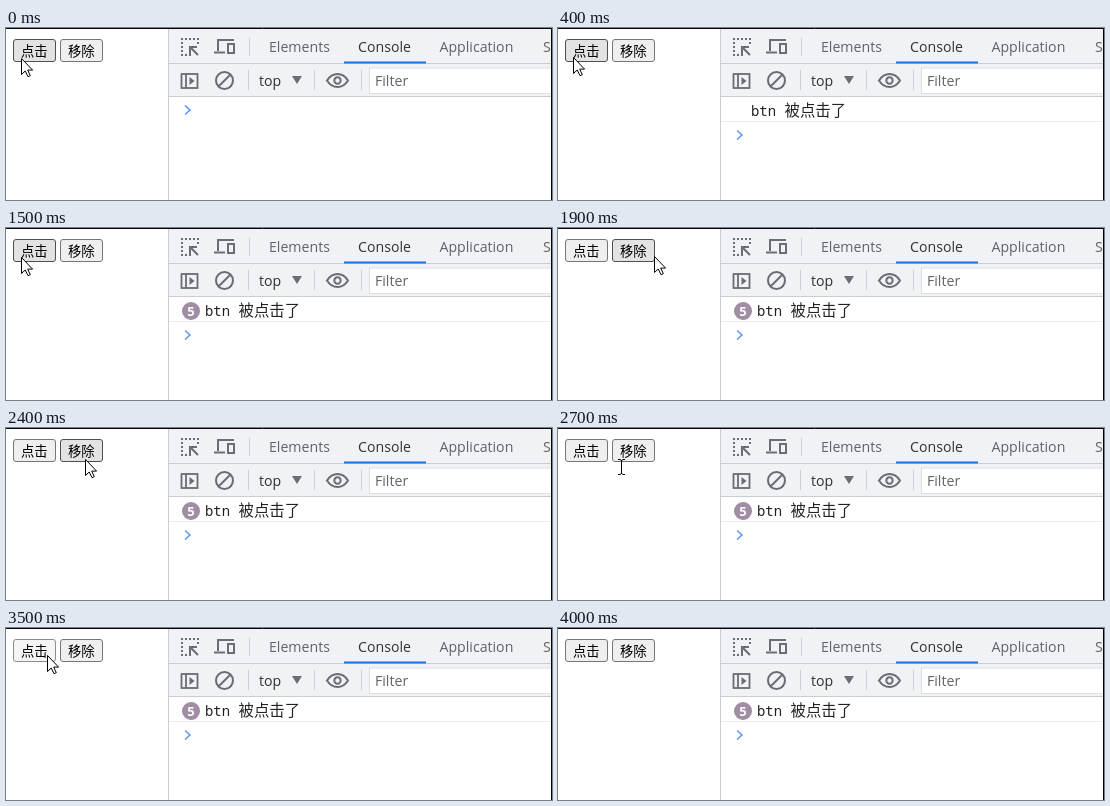
An HTML page that plays this animation: 546 by 172 pixels, repeating every 4600 ms.

```html
<!DOCTYPE html>
<html lang="zh">
<head>
<meta charset="utf-8">
<style>
  html, body { margin: 0; width: 100%; height: 100%; overflow: hidden; background: #fff; }
  svg { display: block; }
  text { font: 14.15px "Open Sans", sans-serif; fill: #5f6368; white-space: pre; }
  .dark { fill: #303236; }
  .btn rect { fill: #efefef; stroke: #767676; }
  .btn.hover rect { fill: #e3e3e3; stroke: #4f4f4f; }
  .btn.active rect { fill: #f5f5f5; stroke: #8d8d8d; }
  .btn text { font: 13.33px "Noto Sans CJK SC", sans-serif; fill: #000; }
  .icon { fill: none; stroke: #6a6d71; stroke-width: 2; }
  .solid { fill: #6a6d71; stroke: none; }
  .sep { stroke: #cacdd1; fill: none; }
  #log text { fill: #222; }
  #log .code { font: 13.9px "Noto Sans Mono", monospace; }
  #log .han { font: 15.4px "Noto Sans CJK SC", sans-serif; }
  #log #count { font: bold 13px "Open Sans", sans-serif; fill: #fff; text-anchor: middle; }
</style>
</head>
<body>
<svg width="546" height="172" viewBox="0 0 546 172">
  <rect width="546" height="172" fill="#fff"/>

  <!-- page buttons -->
  <g class="btn"><rect x="7.5" y="11.5" width="42" height="22" rx="2.5"/><text x="15" y="27.5">点击</text></g>
  <g class="btn"><rect x="54.5" y="11.5" width="42" height="22" rx="2.5"/><text x="62" y="27.5">移除</text></g>

  <!-- developer tools -->
  <rect x="163" y="1" width="382" height="68" fill="#f0f2f5"/>
  <path class="sep" d="M162.5 1V172M163 35.5H545M163 68.5H545M243.5 10V28M242.5 42V62M308.5 42V62M355.5 42V62"/>
  <rect x="338" y="33.5" width="82" height="2" fill="#1a73e8"/>
  <rect x="363.5" y="40" width="184" height="25.5" fill="#fff" stroke="#dcdfe3"/>
  <text x="263" y="24">Elements</text>
  <text x="352" y="24" class="dark">Console</text>
  <text x="433.5" y="24">Application</text>
  <text x="537" y="24">Sources</text>
  <text x="253" y="57.5" class="dark">top</text>
  <text x="369" y="58">Filter</text>

  <g class="icon">
    <path d="M175 11H193M176 10V28M192 10V16M175 27H185" stroke-dasharray="2"/>
    <path d="M192 27L185 20M184 26V19H191"/>
    <path d="M212 23V12H228M208 24.5H219"/>
    <rect x="222" y="16" width="6" height="9"/>
    <rect x="175.5" y="46" width="16" height="14" stroke-width="1.8"/>
    <path d="M180 46V60" stroke-width="1.8"/>
    <circle cx="218.5" cy="52.5" r="8.5"/>
    <path d="M212.5 58.5L224.5 46.5"/>
    <path d="M321 52.5Q325 46 331.5 46T342 52.5Q338 59 331.5 59T321 52.5Z"/>
    <circle cx="331.5" cy="52.5" r="3.2"/>
    <path class="solid" d="M183.5 49V57L188.5 53ZM286 48H296L291 56Z"/>
  </g>

  <g id="log">
    <path d="M163 93.5H545" stroke="#ececee"/>
    <g id="badge"><circle cx="185" cy="83" r="9" fill="#a08da4"/><text id="count" x="185" y="87.7"></text></g>
    <g id="message"><text class="code" x="199" y="88">btn</text><text class="han" x="232.5" y="88">被点击了</text></g>
  </g>
  <path id="prompt" d="M179 77.5L184 82L179 86.5" fill="none" stroke="#5f97ee" stroke-width="1.6"/>

  <path d="M0 .5H546M545.5 0V172" stroke="#000"/>

  <g id="pointer">
    <path id="arrow" d="M.5 .5V16.5L4.2 13L7 18.7L9.3 17.7L6.7 12.1H11.6Z" fill="#fff" stroke="#000"/>
    <path id="beam" d="M-3 -7.5H-1L.5 -6.5L2 -7.5H4M.5 -7V7M-3 7.5H-1L.5 6.5L2 7.5H4" fill="none" stroke="#000"/>
  </g>
</svg>
<script>
const LOOP = 4600, STEP = 100;
const $ = id => document.getElementById(id);
const buttons = [...document.querySelectorAll('.btn')];

// pointer path: time, x, y
const path = [
  [0, 15, 30], [100, 15, 29], [1500, 15, 29], [1600, 24, 30], [1700, 51, 32],
  [1800, 82, 30], [1900, 96, 28], [2000, 86, 27], [2300, 86, 27], [2500, 72, 34],
  [2600, 65, 39], [2700, 63, 39], [2800, 51, 33], [2900, 41, 27], [3500, 41, 27],
  [3600, 70, 36], [3900, 509, 153]
];
const presses = [800, 1000, 1200, 1400, 2100, 2900, 3100, 3300, 3500];
const clicks = [300, 900, 1100, 1300, 1500];

function pointerAt(t) {
  const i = path.findIndex(p => p[0] >= t);
  if (i < 0) return null;
  if (i === 0) return path[0].slice(1);
  const [t0, x0, y0] = path[i - 1], [t1, x1, y1] = path[i];
  const k = (t - t0) / (t1 - t0);
  return [Math.round(x0 + (x1 - x0) * k), Math.round(y0 + (y1 - y0) * k)];
}

const show = (id, on) => $(id).setAttribute('visibility', on ? 'inherit' : 'hidden');
const move = (id, x, y) => $(id).setAttribute('transform', `translate(${x} ${y})`);

function draw(now) {
  const t = Math.floor(now % LOOP / STEP) * STEP;
  const pos = pointerAt(t);
  const beam = t >= 2600 && t < 2800;

  show('pointer', pos);
  show('arrow', !beam);
  show('beam', beam);
  if (pos) move('pointer', ...pos);

  buttons.forEach((button, i) => {
    const left = 7 + 47 * i;
    const over = pos && pos[0] >= left && pos[0] < left + 43 && pos[1] >= 11 && pos[1] < 34;
    button.classList.toggle('hover', !!over);
    button.classList.toggle('active', !!over && presses.includes(t));
  });

  const count = clicks.filter(c => c <= t).length;
  show('log', count);
  show('badge', count > 1);
  $('count').textContent = count;
  move('message', count > 1 ? 0 : -6, 0);
  move('prompt', 0, count ? 25 : 0);
}

function tick() {
  draw(performance.now());
  requestAnimationFrame(tick);
}
tick();
</script>
</body>
</html>
```
